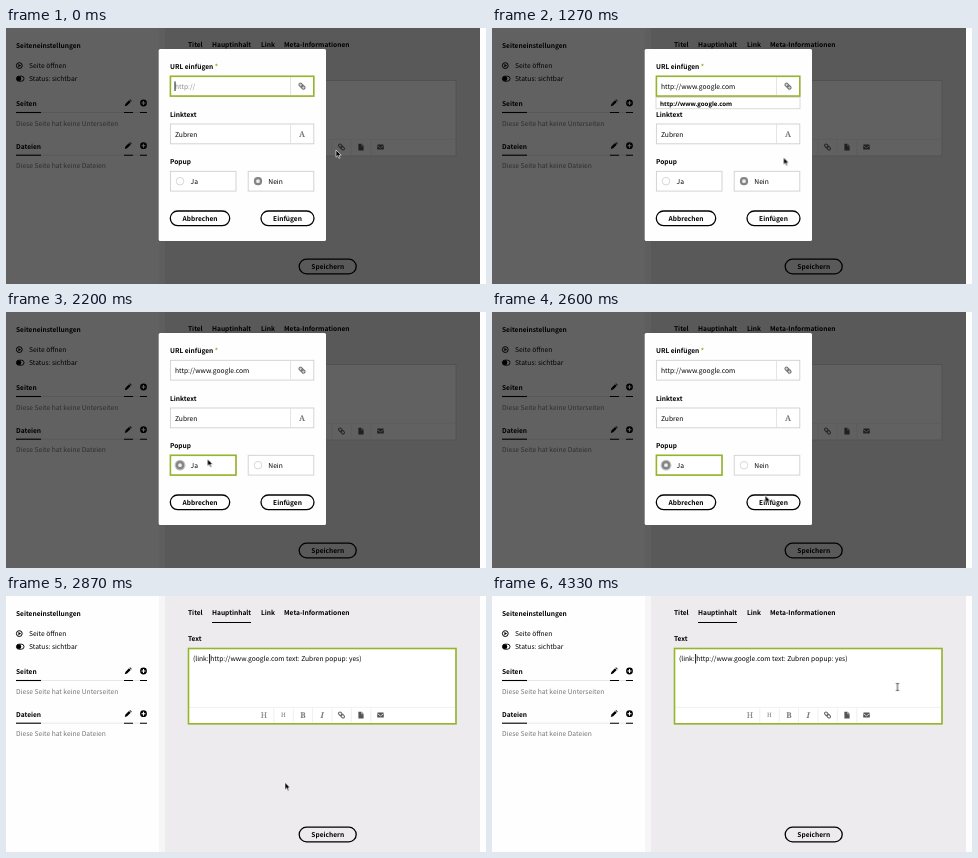
An HTML page for the animation above (4.39 s loop, 480 by 256 pixels).

```html
<!DOCTYPE html>
<html lang="de">
<head>
<meta charset="utf-8">
<title>Link einfügen</title>
<style>
html, body { margin: 0; width: 100%; height: 100%; overflow: hidden; background: #fff; }
svg { display: block; width: 480px; height: 256px; }
text {
  font: 6.7px "Noto Sans CJK JP", "Noto Sans CJK SC", "Noto Sans CJK KR", "Noto Sans CJK TC", "Open Sans", sans-serif;
  text-rendering: geometricPrecision;
  white-space: pre;
}
.b { font-weight: 700; font-size: 6.6px; }
.mid { text-anchor: middle; }
.soft { fill: #777; }
.serif { font-family: "Noto Serif", "Liberation Serif", serif; font-weight: 700; fill: #777; text-anchor: middle; }
.list text { font: 700 6.15px "Open Sans", sans-serif; }
.line { stroke: #d8d8d8; }
.field { fill: #fff; stroke: #cfcfcf; }
.focus { fill: none; stroke: #94b52c; stroke-width: 1.6; }
.btn { fill: none; stroke: #000; stroke-width: 1.3; }
.ink { stroke: #000; }

/* switches: hard changes over one 4390 ms loop */
.dialog, .after, .empty, .typed, .list, .caret, .url-focus, .ja, .nein, .ja-focus,
.hover, .ring, .arrow, .hand, .beam, .blink {
  animation: 4390ms step-end infinite;
}
.dialog { animation-name: dialog; }
.after { animation-name: after; }
.empty { animation-name: empty; }
.typed { animation-name: typed; }
.list { animation-name: list; }
.caret { animation-name: caret; }
.url-focus { animation-name: url-focus; }
.ja { animation-name: ja; }
.nein { animation-name: nein; }
.ja-focus { animation-name: ja-focus; }
.hover { animation-name: hover; }
.ring { animation-name: ring; }
.arrow { animation-name: arrow; }
.hand { animation-name: hand; }
.beam { animation-name: beam; }
.blink { animation-name: blink; }
@keyframes dialog { 0% { opacity: 1 } 65.37%, 100% { opacity: 0 } }
@keyframes after { 0% { opacity: 0 } 65.37%, 100% { opacity: 1 } }
@keyframes empty { 0% { opacity: 1 } 1.59%, 100% { opacity: 0 } }
@keyframes typed { 0% { opacity: 0 } 1.59%, 100% { opacity: 1 } }
@keyframes list { 0% { opacity: 0 } 4.55% { opacity: 1 } 41%, 100% { opacity: 0 } }
@keyframes caret { 0% { opacity: 0 } 1.59% { opacity: 1 } 15.26%, 100% { opacity: 0 } }
@keyframes url-focus { 0% { opacity: 1 } 41%, 100% { opacity: 0 } }
@keyframes ja { 0% { opacity: 0 } 42.59%, 100% { opacity: 1 } }
@keyframes nein { 0% { opacity: 1 } 42.59%, 100% { opacity: 0 } }
@keyframes ja-focus { 0% { opacity: 0 } 42.59% { opacity: 1 } 62.18%, 100% { opacity: 0 } }
@keyframes hover { 0% { opacity: 0 } 59.6%, 100% { opacity: 1 } }
@keyframes ring { 0% { opacity: 0 } 41% { opacity: 1 } 45.55% { opacity: 0 } 62.18% { opacity: 1 } 65.37%, 100% { opacity: 0 } }
@keyframes arrow { 0% { opacity: 1 } 59.6% { opacity: 0 } 65.37% { opacity: 1 } 92%, 100% { opacity: 0 } }
@keyframes hand { 0% { opacity: 0 } 59.6% { opacity: 1 } 65.37%, 100% { opacity: 0 } }
@keyframes beam { 0% { opacity: 0 } 92%, 100% { opacity: 1 } }
@keyframes blink { 0% { opacity: 1 } 77.4% { opacity: 0 } 89.5%, 100% { opacity: 1 } }

.mouse { animation: mouse 4390ms ease-in-out infinite; }
@keyframes mouse {
  0%, 24.4% { transform: translate(330px, 122px) }
  36.4%, 51.9% { transform: translate(201.5px, 147px) }
  61%, 85.2% { transform: translate(279px, 186.5px) }
  97.2%, 100% { transform: translate(405.5px, 91px) }
}
</style>
</head>
<body>
<svg viewBox="0 0 480 256">
  <defs>
    <g id="chain" fill="none" stroke="#666" stroke-width="1.1">
      <g transform="rotate(45)">
        <rect x="-3.6" y="-1.4" width="4" height="2.8" rx="1.4"/>
        <rect x="-.4" y="-1.4" width="4" height="2.8" rx="1.4"/>
      </g>
    </g>
    <g id="edit">
      <path d="M-3.2 3.2l.6-2.3L1-2.7 2.7-1-.9 2.6zM1.5-3.2l.6-.5 1.7 1.7-.6.5z"/>
      <circle cx="15.5" r="3.4"/>
      <path d="M13.5 0h4M15.5-2v4" stroke="#fff" stroke-width="1.1"/>
    </g>
    <g id="rule" fill="none">
      <path class="line" d="M10 0h131" stroke-width=".6"/>
      <path class="ink" d="M118 0h9M134 0h7" stroke-width="1.1"/>
    </g>
    <g id="dot">
      <circle r="3" fill="#eee" stroke="#858585" stroke-width="2.2"/>
    </g>
  </defs>

  <!-- page -->
  <rect width="480" height="256" fill="#fefefe"/>
  <rect x="153" width="6" height="256" fill="#f6f6f6"/>
  <rect x="159" width="315" height="256" fill="#edebed"/>

  <text class="b" x="10" y="19.5">Seiteneinstellungen</text>
  <circle cx="13.3" cy="37.6" r="2.9" fill="none" class="ink" stroke-width="1"/>
  <path d="M12.4 35.9l2.7 1.7-2.7 1.7z"/>
  <text x="23" y="40.4">Seite öffnen</text>
  <rect x="10.4" y="48.2" width="7.6" height="5" rx="2.5" fill="none" class="ink" stroke-width=".9"/>
  <circle cx="12.9" cy="50.7" r="2.4"/>
  <text x="23" y="53.4">Status: sichtbar</text>

  <text class="b" x="10" y="77.5">Seiten</text>
  <use href="#edit" x="122" y="75"/>
  <use href="#rule" y="84.5"/>
  <path class="ink" d="M10 84.5h25" stroke-width="1.1"/>
  <text class="soft" x="10" y="97.6">Diese Seite hat keine Unterseiten</text>
  <text class="b" x="10" y="120.5">Dateien</text>
  <use href="#edit" x="122" y="117.7"/>
  <use href="#rule" y="127.2"/>
  <path class="ink" d="M10 127.2h25" stroke-width="1.1"/>
  <text class="soft" x="10" y="140.3">Diese Seite hat keine Dateien</text>

  <g class="b">
    <text class="b" x="182" y="18.7">Titel</text>
    <text class="b" x="206" y="18.7">Hauptinhalt</text>
    <text class="b" x="255" y="18.7">Link</text>
    <text class="b" x="278" y="18.7">Meta-Informationen</text>
    <text class="b" x="182" y="45">Text</text>
  </g>
  <path class="ink" d="M206 26.5h39" stroke-width="1.1"/>

  <rect class="field" x="182.5" y="52.5" width="267.5" height="75.5" stroke-width=".8"/>
  <path class="line" d="M183 111.3h267M267.8 112v15M287.3 112v15M306.6 112v15M326 112v15M345.3 112v15M364.8 112v15" stroke-width=".4"/>
  <text class="serif" x="258" y="121.8" style="font-size:8px;font-weight:400">H</text>
  <text class="serif" x="277.5" y="121.4" style="font-size:6px;font-weight:400">H</text>
  <text class="serif" x="297" y="121.8" style="font-size:8px">B</text>
  <text class="serif" x="316" y="121.8" style="font-size:8px;font-style:italic">I</text>
  <use href="#chain" x="335.5" y="119"/>
  <path d="M352.4 115.8h3.2l2 2v4.6h-5.2z" fill="#555"/>
  <path d="M355.6 115.8v2h2" fill="none" stroke="#fff" stroke-width=".5"/>
  <rect x="371.2" y="116.6" width="6.6" height="5" rx=".6" fill="#555"/>
  <path d="M371.2 117.6l3.3 2.3 3.3-2.3" fill="none" stroke="#fff" stroke-width=".7"/>

  <g class="after">
    <rect class="focus" x="182.5" y="52.5" width="267.5" height="75.3"/>
    <text x="187" y="65.2">(link: http://www.google.com text: Zubren popup: yes)</text>
    <path class="ink blink" d="M203.6 58v9.5" stroke-width=".9"/>
  </g>

  <rect class="btn" x="293.2" y="231.2" width="57" height="14.6" rx="7.3"/>
  <text class="b mid" x="321.7" y="241">Speichern</text>

  <!-- dialog -->
  <g class="dialog">
    <rect width="474" height="256" opacity=".62"/>
    <rect x="152.7" y="21" width="167.3" height="192" rx="1.6" fill="#fefefe"/>

    <text class="b" x="164" y="41">URL einfügen <tspan fill="#94b52c">*</tspan></text>
    <rect class="field" x="164.4" y="48.3" width="143.4" height="19.8" stroke-width=".9"/>
    <path class="line" d="M284.5 49v18.5" stroke-width=".7"/>
    <rect class="focus url-focus" x="164.4" y="48.3" width="143.4" height="19.8"/>
    <use href="#chain" x="296" y="58.2"/>
    <g class="empty">
      <text x="169" y="61" fill="#8c8c8c">http://</text>
      <path class="ink" d="M169 53.4v9.6" stroke-width=".9"/>
    </g>
    <text class="typed" x="169" y="61">http://www.google.com</text>
    <path class="ink caret" d="M244.5 53.2v9.8" stroke-width=".9"/>

    <text class="b" x="164" y="88.5">Linktext</text>
    <rect class="field" x="164.4" y="96" width="143.4" height="19.8" stroke-width=".9"/>
    <path class="line" d="M284.5 96.5v19" stroke-width=".7"/>
    <text x="169" y="108.5">Zubren</text>
    <text class="serif" x="296" y="109" style="font-size:8px">A</text>

    <g class="list">
      <rect x="164" y="69.2" width="144" height="11.6" fill="#fff" stroke="#c4c4c4" stroke-width=".6"/>
      <text x="168" y="77.7">http://www.google.com</text>
    </g>

    <text class="b" x="164" y="136">Popup</text>
    <rect class="field" x="164.4" y="143.3" width="65.6" height="19.8" stroke-width=".9"/>
    <rect class="field" x="242.2" y="143.3" width="65.6" height="19.8" stroke-width=".9"/>
    <rect class="focus ja-focus" x="164.4" y="143.3" width="65.6" height="19.8"/>
    <circle class="field" cx="174" cy="153.2" r="3.8" stroke-width=".8"/>
    <circle class="field" cx="252" cy="153.2" r="3.8" stroke-width=".8"/>
    <circle class="ja-focus" cx="174" cy="153.2" r="5.4" fill="#bdbdbd"/>
    <g class="ja"><use href="#dot" x="174" y="153.2"/></g>
    <g class="nein"><use href="#dot" x="252" y="153.2"/></g>
    <text x="184.6" y="156">Ja</text>
    <text x="262.3" y="156">Nein</text>

    <rect class="btn" x="164.3" y="183" width="59.4" height="14.6" rx="7.3"/>
    <text class="b mid" x="194" y="192.8">Abbrechen</text>
    <rect class="btn" x="255" y="183" width="53" height="14.6" rx="7.3"/>
    <text class="b mid" x="281.5" y="192.8">Einfügen</text>
    <g class="hover">
      <rect x="254.4" y="182.4" width="54.2" height="15.8" rx="7.9"/>
      <text class="b mid" x="281.5" y="192.8" fill="#fff">Einfügen</text>
    </g>
  </g>

  <!-- pointer -->
  <g class="mouse">
    <g class="ring" fill="none">
      <circle cy="1" r="13.2" stroke="#fff" stroke-width="3"/>
      <circle cy="1" r="13.5" stroke="#111" stroke-width="1.5"/>
    </g>
    <path class="arrow" d="M0 0v7.2l1.7-1.6 1.2 2.7 1.2-.5-1.2-2.6h2.3z" stroke="#fff" stroke-width=".6"/>
    <path class="hand" d="M-.6 0q.8-.9 1.5 0v2.7l2.9.7q.8.3.7 1.2l-.5 2.9H-.3l-2.3-3q.1-.9 1.1-.5l.9.8z" fill="#fff" stroke="#000" stroke-width=".6"/>
    <path class="beam" d="M-1.5-3.7Q0-3.7 0-2.7 0-3.7 1.5-3.7M0-2.7v5.4M-1.5 3.7Q0 3.7 0 2.7 0 3.7 1.5 3.7" fill="none" stroke="#222" stroke-width=".8"/>
  </g>
</svg>
</body>
</html>
```
